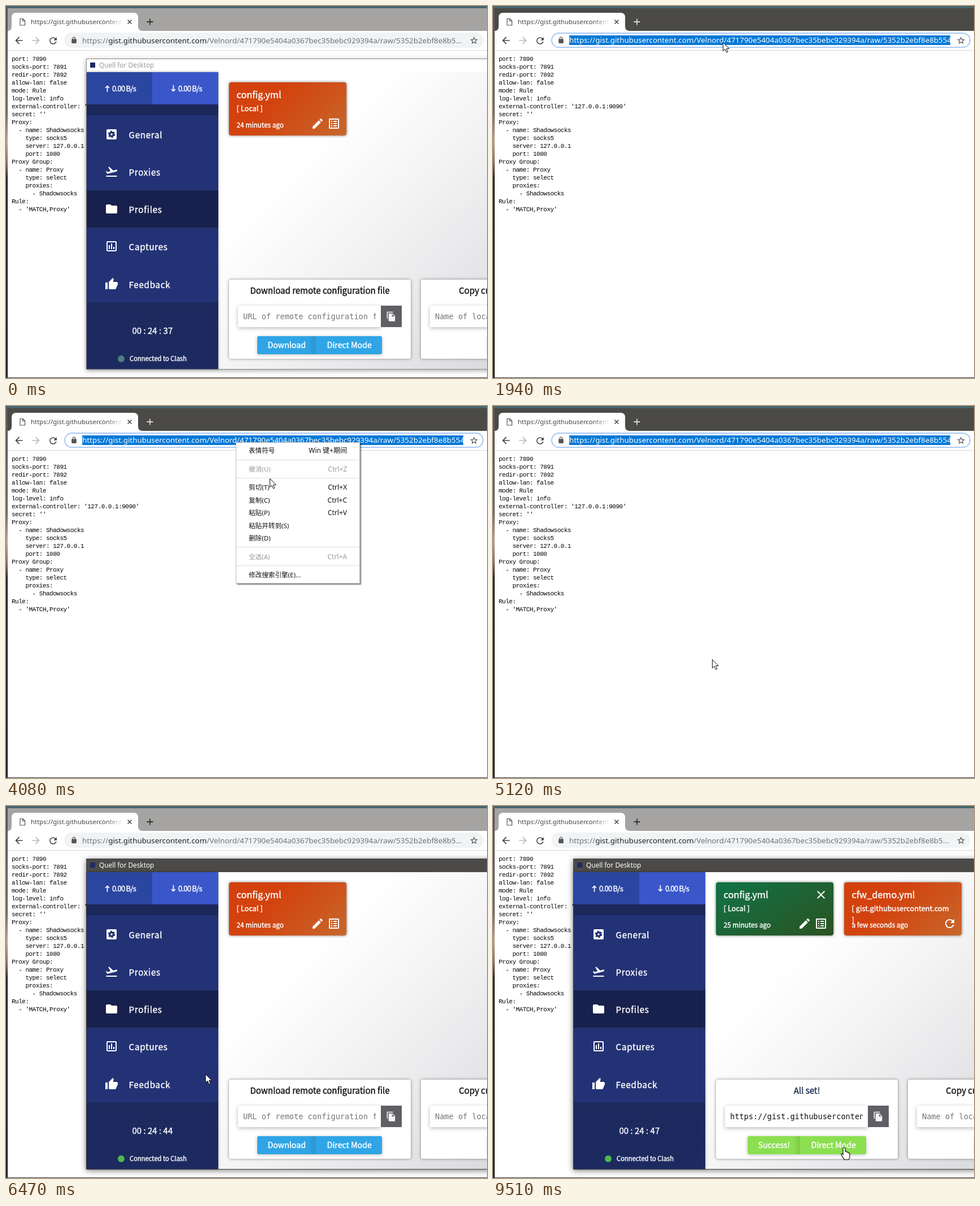
An HTML page for the animation above (9.74 s loop, 852 by 658 pixels).

```html
<!DOCTYPE html>
<html lang="zh">
<head>
<meta charset="utf-8">
<title>Import a profile</title>
<style>
html,body{margin:0;width:100%;height:100%;overflow:hidden}
#stage{position:relative;width:852px;height:658px;overflow:hidden;background:#26282b}
#stage div,#stage span,#stage svg{position:absolute;box-sizing:border-box}
#stage span{line-height:20px;white-space:pre}
#stage i{font-style:normal}
#stage .layer{left:0;top:0;width:0;height:0}
.ui{font-family:"Noto Sans","Noto Sans CJK SC",sans-serif}
.app{font-family:"Noto Sans CJK SC","Noto Sans CJK","Noto Sans",sans-serif;-webkit-text-stroke:.4px}
.mono{font-family:"DejaVu Sans Mono",monospace;-webkit-text-stroke:0}
pre{position:absolute;margin:0;left:10px;top:87px;font:11px/14px "Liberation Mono",monospace;letter-spacing:-.5px;color:#000}
.tabbar{background:#a5a4a3}
.focus .tabbar{background:#4b4a47}
.pill{background:#f1f3f4}
.focus .pill{background:#fff;border:2px solid #a9c8f5}
.plus{stroke:#333}
.focus .plus{stroke:#d8d8d6}
.frame{background:#fff;border:1px solid #8b8b8b;box-shadow:0 2px 8px rgba(0,0,0,.35)}
.on .frame{background:#4b4a48;border-color:#454442;box-shadow:0 2px 10px rgba(0,0,0,.5)}
.name{color:#9a9a9a}
.on .name{color:#fff}
.dot{background:#4f7d80}
.on .dot{background:#4db852}
.card{border-radius:4px;box-shadow:0 0 5px rgba(0,0,0,.55)}
.panel{border-radius:4px;background:#fff;box-shadow:0 0 5px rgba(0,0,0,.45)}
.field{background:#fff;box-shadow:0 2px 7px rgba(0,0,0,.28)}
.btn{border-radius:3px;box-shadow:0 1px 6px rgba(0,0,0,.25)}
</style>
</head>
<body>
<div id="stage"></div>
<script>
const LOOP = 9740;
const stage = document.getElementById('stage');

const D = {
  back: 'M20 11H7.83l5.59-5.59L12 4l-8 8 8 8 1.41-1.41L7.83 13H20v-2z',
  reload: 'M17.65 6.35C16.2 4.9 14.21 4 12 4c-4.42 0-7.99 3.58-7.99 8s3.57 8 7.99 8c3.73 0 6.84-2.55 7.73-6h-2.08c-.82 2.33-3.04 4-5.65 4-3.31 0-6-2.69-6-6s2.69-6 6-6c1.66 0 3.14.69 4.22 1.78L13 11h7V4l-2.35 2.35z',
  star: 'M22 9.24l-7.19-.62L12 2 9.19 8.63 2 9.24l5.46 4.73L5.82 21 12 17.27 18.18 21l-1.63-7.03L22 9.24zM12 15.4l-3.76 2.27 1-4.28-3.32-2.88 4.38-.38L12 6.1l1.71 4.04 4.38.38-3.32 2.88 1 4.28L12 15.4z',
  lock: 'M18 8h-1V6A5 5 0 0 0 7 6v2H6a2 2 0 0 0-2 2v10a2 2 0 0 0 2 2h12a2 2 0 0 0 2-2V10a2 2 0 0 0-2-2zM9 8V6a3 3 0 0 1 6 0v2z',
  close: 'M19 6.41L17.59 5 12 10.59 6.41 5 5 6.41 10.59 12 5 17.59 6.41 19 12 13.41 17.59 19 19 17.59 13.41 12z',
  pen: 'M3 17.25V21h3.75L17.81 9.94l-3.75-3.75L3 17.25zM20.71 7.04c.39-.39.39-1.02 0-1.41l-2.34-2.34c-.39-.39-1.02-.39-1.41 0l-1.83 1.83 3.75 3.75 1.83-1.83z',
  list: 'M19 5v14H5V5h14m1.1-2H3.9c-.5 0-.9.4-.9.9v16.2c0 .4.4.9.9.9h16.2c.4 0 .9-.5.9-.9V3.9c0-.5-.5-.9-.9-.9zM11 7h6v2h-6V7zm0 4h6v2h-6v-2zm0 4h6v2h-6zM7 7h2v2H7zm0 4h2v2H7zm0 4h2v2H7z',
  copy: 'M16 1H4c-1.1 0-2 .9-2 2v14h2V3h12V1zm-1 4l6 6v10c0 1.1-.9 2-2 2H7.99C6.89 23 6 22.1 6 21l.01-14c0-1.1.89-2 1.99-2h7zm-1 7h5.5L14 6.5V12z',
  gear: 'M5 3h14a2 2 0 0 1 2 2v14a2 2 0 0 1-2 2H5a2 2 0 0 1-2-2V5a2 2 0 0 1 2-2z',
  plane: 'M2.5 19h19v2h-19zm19.57-9.36c-.21-.8-1.04-1.28-1.84-1.06L14.92 10l-6.9-6.43-1.93.51 4.14 7.17-4.97 1.33-1.97-1.54-1.45.39 1.82 3.16.77 1.33 1.6-.43 5.31-1.42 4.35-1.16L21 11.49c.81-.23 1.28-1.05 1.07-1.85z',
  folder: 'M10 4H4c-1.1 0-1.99.9-1.99 2L2 18c0 1.1.9 2 2 2h16c1.1 0 2-.9 2-2V8c0-1.1-.9-2-2-2h-8l-2-2z',
  chart: 'M9 17H7v-7h2v7zm4 0h-2V7h2v10zm4 0h-2v-4h2v4zm2 2H5V5h14v14zm0-16H5c-1.1 0-2 .9-2 2v14c0 1.1.9 2 2 2h14c1.1 0 2-.9 2-2V5c0-1.1-.9-2-2-2z',
  thumb: 'M1 21h4V9H1v12zm22-11c0-1.1-.9-2-2-2h-6.31l.95-4.57.03-.32c0-.41-.17-.79-.44-1.06L14.17 1 7.59 7.59C7.22 7.95 7 8.45 7 9v10c0 1.1.9 2 2 2h9c.83 0 1.54-.5 1.84-1.22l3.02-7.05c.09-.23.14-.47.14-.73v-2z'
};

const box = (x, y, w, h, css = '', cls = '') =>
  `<div class="${cls}" style="left:${x}px;top:${y}px;width:${w}px;height:${h}px;${css}"></div>`;
// y is the middle of the line
const text = (x, y, size, str, css = '', cls = '') =>
  `<span class="${cls}" style="left:${x}px;top:${y - 10}px;font-size:${size}px;${css}">${str}</span>`;
const mid = (x, y, size, str, css = '', cls = '') =>
  text(x, y, size, str, 'transform:translateX(-50%);' + css, cls);
const icon = (x, y, size, d, color = '#fff', extra = '') =>
  `<svg viewBox="0 0 24 24" width="${size}" height="${size}" style="left:${x - size / 2}px;top:${y - size / 2}px"><path d="${d}" fill="${color}"/>${extra}</svg>`;
const layer = (cls, inner) => `<div class="layer ${cls}">${inner}</div>`;
const fill = c => `background:${c};`;
const white = 'color:#fff;';

const HOST = 'gist.githubusercontent.com';
const PATH = '/Velnord/471790e5404a0367bec35bebc929394a/raw/5352b2ebf8e8b5';
const APP = 'Quell for Desktop';
const YAML = `port: 7890
socks-port: 7891
redir-port: 7892
allow-lan: false
mode: Rule
log-level: info
external-controller: '127.0.0.1:9090'
secret: ''
Proxy:
  - name: Shadowsocks
    type: socks5
    server: 127.0.0.1
    port: 1080
Proxy Group:
  - name: Proxy
    type: select
    proxies:
      - Shadowsocks
Rule:
  - 'MATCH,Proxy'`;

const FADE = 'linear-gradient(90deg,#000 82%,transparent)';
const browser = layer('ui',
  box(0, 0, 852, 4, fill('#48666d')) +
  box(0, 4, 3, 654, fill('linear-gradient(#53565a,#6d6866 28%,#c3a294 36%,#8d6a60 42%,#2a2527 46%,#232427)')) +
  box(3, 4, 849, 41, '', 'tabbar') +
  box(3, 44, 849, 613, fill('#fff')) +
  `<svg width="270" height="46" style="left:0;top:0" fill="none">
    <path d="M3 44Q10 44 10 36V20Q10 12 18 12H226Q234 12 234 20V36Q234 44 242 44Z" fill="#fff"/>
    <path d="M25 22.5h5l3.5 3.5v8h-8.5zM29.5 22.5v4h4" stroke="#555" stroke-width="1.2"/>
    <path d="M215.5 24.5l7 7m0-7l-7 7" stroke="#444" stroke-width="1.5"/>
    <path class="plus" d="M249.5 28h11M255 22.5v11" stroke-width="1.8"/></svg>` +
  text(44, 28, 11.4, 'https://' + HOST, `color:#444;width:163px;overflow:hidden;-webkit-mask:${FADE};mask:${FADE}`) +
  icon(23, 61, 20, D.back, '#444') +
  `<div style="left:53px;top:61px;transform:scaleX(-1)">${icon(0, 0, 20, D.back, '#bbb')}</div>` +
  icon(83, 61, 19, D.reload, '#444') +
  box(103, 47, 743, 27, 'border-radius:14px', 'pill') +
  icon(120, 60, 13, D.lock, '#555') +
  icon(829, 61, 16, D.star, '#444') +
  text(135, 61, 13.4, `https://<i style="color:#202124">${HOST}</i>${PATH}...`, 'color:#70757a', 'plain') +
  text(135, 61, 13.4, `https://${HOST}${PATH}54a1`, white + fill('#0078d7') + 'width:675px;height:17px;line-height:17px;margin-top:1px;overflow:hidden', 'picked') +
  box(3, 78, 849, 1, fill('#d9d9d9')) +
  `<pre>${YAML}</pre>` +
  box(0, 657, 852, 1, fill('#34363a')));

const NAV = [['General', 'gear'], ['Proxies', 'plane'], ['Profiles', 'folder'], ['Captures', 'chart'], ['Feedback', 'thumb']];
const cog = `<g fill="none" stroke="#233275"><circle cx="12" cy="12" r="3.4" stroke-width="3.2"/>
  <circle cx="12" cy="12" r="5.4" stroke-width="2" stroke-dasharray="2.83"/></g>`;
const arrows = { 175: 'M4.5 12V1.5M1 5l3.5-3.5L8 5', 292: 'M4.5 0v10.5M1 7l3.5 3.5L8 7' };
const speed = x =>
  `<svg width="9" height="12" style="left:${x}px;top:140px"><path d="${arrows[x]}" fill="none" stroke="#fff" stroke-width="1.7"/></svg>` +
  text(x + 13, 145.5, 13, '0.00 B/s', white + 'letter-spacing:-.65px;word-spacing:-.5px');
const sidebar =
  box(143, 117, 233, 525, fill('linear-gradient(#1b2858,#1c2a60)') + 'box-shadow:0 0 4px rgba(0,0,0,.4)') +
  box(143, 117, 116, 57, fill('#2b46a0')) + box(259, 117, 117, 57, fill('#3a56c9')) +
  speed(175) + speed(292) +
  NAV.map(([label, key], i) => {
    const y = 193 + i * 66.3;
    return box(143, y, 233, 66.3, fill(i == 2 ? '#18214d' : '#233275')) +
      icon(187, y + 33.5, 24, D[key], '#fff', i ? '' : cog) +
      text(217.5, y + 33.5, 15.2, label, white + 'letter-spacing:.7px');
  }).join('') +
  text(223.5, 573.5, 15, '', white, 'clock') +
  box(198, 617.5, 12, 12, 'border-radius:6px', 'dot') +
  text(219, 623, 11.2, 'Connected to Clash', white);

const ORANGE = 'linear-gradient(135deg,#d3420e 35%,#c8672b)';
const GREEN = 'linear-gradient(150deg,#117347,#2b5322)';
const profile = (x, color, title, sub, age, icons) =>
  box(x, 135, 208, 93.5, fill(color), 'card') +
  text(x + 13.5, 156, 16.3, title, white) + text(x + 13.5, 181, 12.8, sub, white) +
  text(x + 13.5, 210.3, 11.8, age, white) + icons;
const tools = icon(552, 208, 24, D.pen) + icon(581, 208, 24, D.list);

const entry = (x, title, cx, hint, cls) =>
  box(x, 484, 322, 140, '', 'panel') +
  mid(cx, 503, 15, title, 'color:#111', cls) +
  box(x + 16, 530, 253, 38, '', 'field') +
  text(x + 25, 549, 13.6, hint, 'color:#757575;width:235px;overflow:hidden', 'mono ' + cls);
const buttons = (x, split, w, color, a, b) =>
  box(x, 583.5, w, 32.5, fill(`linear-gradient(90deg,transparent 88%,rgba(0,0,0,.1)) 0 0/${split}px 100% no-repeat,${color}`), 'btn') +
  mid(x + split / 2 + .5, 599.4, 14.2, a, white) + mid((x + split + x + w) / 2 + 1, 599.4, 14.2, b, white);

const body = layer('app body',
  box(376, 117, 682, 525, fill('linear-gradient(135deg,#fff 25%,#f4f4f5 45%,#cfd0d4)')) +
  sidebar +
  layer('before', profile(395, ORANGE, 'config.yml', '[ Local ]', '<i class="age"></i>', tools)) +
  layer('after',
    profile(395, GREEN, 'config.yml', '[ Local ]', '25 minutes ago', tools + icon(581, 157, 24, D.close)) +
    layer('fresh', profile(622, ORANGE, 'cfw_demo.yml', `[ ${HOST}\n]`, 'a few seconds ago', icon(809, 208, 24, D.reload)))) +
  entry(395, 'Download remote configuration file', 556, 'URL of remote configuration file', 'idle') +
  mid(556, 503, 15, 'All set!', 'color:#1e2c55', 'done') +
  text(420, 549, 13.6, 'https://' + HOST, 'color:#111;background:#fff;width:235px;overflow:hidden', 'mono pasted') +
  box(664, 530, 37, 38, fill('#5f6065')) + icon(682, 549, 18.5, D.copy, '#f4f4f4') +
  layer('idle', buttons(445, 103.5, 221, '#2fa5e6', 'Download', 'Direct Mode')) +
  layer('done', buttons(451, 92.5, 210, '#8bdf50', 'Success!', 'Direct Mode')) +
  entry(735, 'Copy current configuration', 896, 'Name of local configuration file', '') +
  box(854, 583.5, 84, 32.5, fill('#2fa5e6'), 'btn') + mid(896, 599.4, 14.2, 'Copy', white));

const win = layer('window',
  box(142, 93, 917, 550, '', 'frame') +
  box(149, 100, 9, 9, fill('#1d2a63')) +
  text(165, 104, 11.8, APP, '', 'ui name') + body);

const K = .1967;
const preview = layer('preview ui on',
  box(164, 526.5, 194, 140, fill('#5d5d5b') + 'box-shadow:0 0 10px rgba(0,0,0,.6)') +
  box(175, 537, 9, 10, fill('#1d2a63')) + text(194, 542, 12.7, APP, white) +
  `<div class="layer" style="transform-origin:0 0;transform:translate(${171 - 143 * K}px,${556 - 117 * K}px) scale(${K})">${body}</div>`);

const MENU = [[79, '表情符号', 'Win 键+期间'], [112, '撤消(U)', 'Ctrl+Z', 1], [144, '剪切(T)', 'Ctrl+X'], [167, '复制(C)', 'Ctrl+C'],
  [189, '粘贴(P)', 'Ctrl+V'], [211.5, '粘贴并转到(S)', ''], [234, '删除(D)', ''], [267, '全选(A)', 'Ctrl+A', 1], [299, '修改搜索引擎(E)...', '']];
const menu = layer('menu ui',
  box(407, 64, 219.5, 250, fill('#fff') + 'border:1px solid #bdbdbd;box-shadow:2px 2px 2px rgba(0,0,0,.5)') +
  box(408, 0, 217, 22, fill('#e8e8e9'), 'hover') +
  [95, 127, 249, 282].map(y => box(408, y, 217, 1, fill('#dedede'))).join('') +
  MENU.map(([y, label, key, off]) => {
    const css = `color:${off ? '#9a9a9a' : '#111'};`;
    return text(430, y, 11.6, label, css) + text(604, y, 12, key, css + 'transform:translateX(-100%)');
  }).join(''));

const pointer = `<svg class="pointer" width="1" height="1" style="left:0;top:0;overflow:visible">
  <circle class="click" r="11" fill="rgba(220,205,0,.82)"/>
  <path class="arrow" d="M.5 .5V15.5L4 12.3L6.5 18L9 17L6.6 11.5H11.3Z" fill="#fff" stroke="#111"/>
  <path class="beam" d="M-3.5-7.5H-1Q0-7.5 0-6.5Q0-7.5 1-7.5H3.5M0-6.5V6.5M-3.5 7.5H-1Q0 7.5 0 6.5Q0 7.5 1 7.5H3.5" fill="none" stroke="#111" stroke-width="1.3"/>
  <path class="hand" d="M-2 2Q-2 0 0 0Q2 0 2 2V7Q4.5 6.5 5 8.5Q7.5 8 8 10Q10 9.5 10 12V16Q9.5 18.5 8 21.5H0Q-1 18.5-3.5 16L-5 13Q-5.5 10.5-3.5 11L-2 12.5Z" fill="#fff" stroke="#111" stroke-width="1.2"/></svg>`;

stage.innerHTML = browser + preview + win + menu + pointer;

// start, last step, step count, then from / bend / to
const MOVES = [
  [600, 1150, 8, 846, 180, 480, 60, 123, 64],
  [1300, 1610, 5, 123, 64, 260, 62, 409, 64],
  [1690, 1770, 2, 409, 64, 408, 64, 407, 64],
  [3620, 4540, 13, 407, 64, 495, 132, 461, 162],
  [4850, 4940, 2, 461, 162, 430, 297, 395, 432],
  [5090, 5400, 6, 395, 432, 345, 540, 291, 651],
  [6170, 7110, 13, 310, 590, 400, 265, 537, 548],
  [7250, 7560, 5, 537, 548, 610, 556, 677, 557],
  [8720, 9040, 5, 677, 557, 655, 585, 622, 604]
];
const CLICKS = [[1690, 1850], [3310, 3470], [4620, 4700], [8030, 8110], [9040, 9200]];
const within = (t, a, b) => t >= a && t < b;

function pointerAt(t) {
  const m = MOVES.filter(m => t >= m[0]).pop();
  if (!m || within(t, 5400, 6170)) return null;
  const [a, b, n, x0, y0, x1, y1, x2, y2] = m;
  const k = Math.min(n - 1, Math.floor((t - a) / (b - a) * (n - 1) + .01));
  const u = (k + 1) / n, e = u * u * (3 - 2 * u), r = 1 - e;
  const curve = (p, q, s) => Math.round(r * r * p + 2 * r * e * q + e * e * s);
  return [curve(x0, x1, x2), curve(y0, y1, y2)];
}

function shape(t, x, y) {
  if (t < 1770) return y < 75 ? 'beam' : 'arrow';
  if (t < 5940) return 'arrow';
  if (within(x, 664, 701) && within(y, 530, 568)) return 'hand';
  if (within(x, 445, 666) && within(y, 584, 616)) return 'hand';
  return within(x, 411, 664) && within(y, 530, 568) ? 'beam' : 'arrow';
}

const cache = {};
const all = cls => cache[cls] || (cache[cls] = [...stage.getElementsByClassName(cls)]);
const show = (cls, yes) => all(cls).forEach(el => el.style.display = yes ? '' : 'none');
const write = (cls, str) => all(cls).forEach(el => { if (el.textContent != str) el.textContent = str; });

function render(t) {
  const focus = within(t, 1770, 5720), done = t >= 9200, added = t >= 9280;
  stage.className = (focus ? 'focus ' : '') + (t >= 5940 ? 'on' : '');
  show('window', t < 1770 || t >= 5940);
  show('plain', !focus);
  show('picked', focus);
  show('preview', within(t, 5720, 5940));
  const rise = Math.max(0, Math.min(1, Math.floor((t - 5720) / 65 + 1) / 3));
  const peek = all('preview')[0].style;
  peek.opacity = rise;
  peek.transform = `translateY(${(1 - rise) * 12}px)`;
  show('idle', !done);
  show('done', done);
  show('before', !added);
  show('after', added);
  all('fresh').forEach(el => el.style.opacity = Math.min(1, .3 + Math.floor((t - 9280) / 77) * .25));
  show('pasted', t >= 8110);
  write('age', (t < 8110 ? 24 : 25) + ' minutes ago');
  write('clock', '00 : 24 : ' + (37 + Math.floor((t + 626.3) / 996.25)));

  const p = pointerAt(t);
  show('menu', within(t, 3390, 4700));
  const row = p && t >= 3620 && MENU.find(m => !m[3] && Math.abs(p[1] - m[0]) < 11);
  show('hover', row);
  if (row) all('hover')[0].style.top = row[0] - 11 + 'px';

  show('pointer', p);
  if (!p) return;
  all('pointer')[0].style.transform = `translate(${p[0]}px,${p[1]}px)`;
  const kind = shape(t, ...p);
  ['arrow', 'beam', 'hand'].forEach(c => show(c, c == kind));
  show('click', CLICKS.some(c => within(t, ...c)));
}

const start = performance.now();
(function tick() {
  render((performance.now() - start) % LOOP);
  requestAnimationFrame(tick);
})();
</script>
</body>
</html>
```
